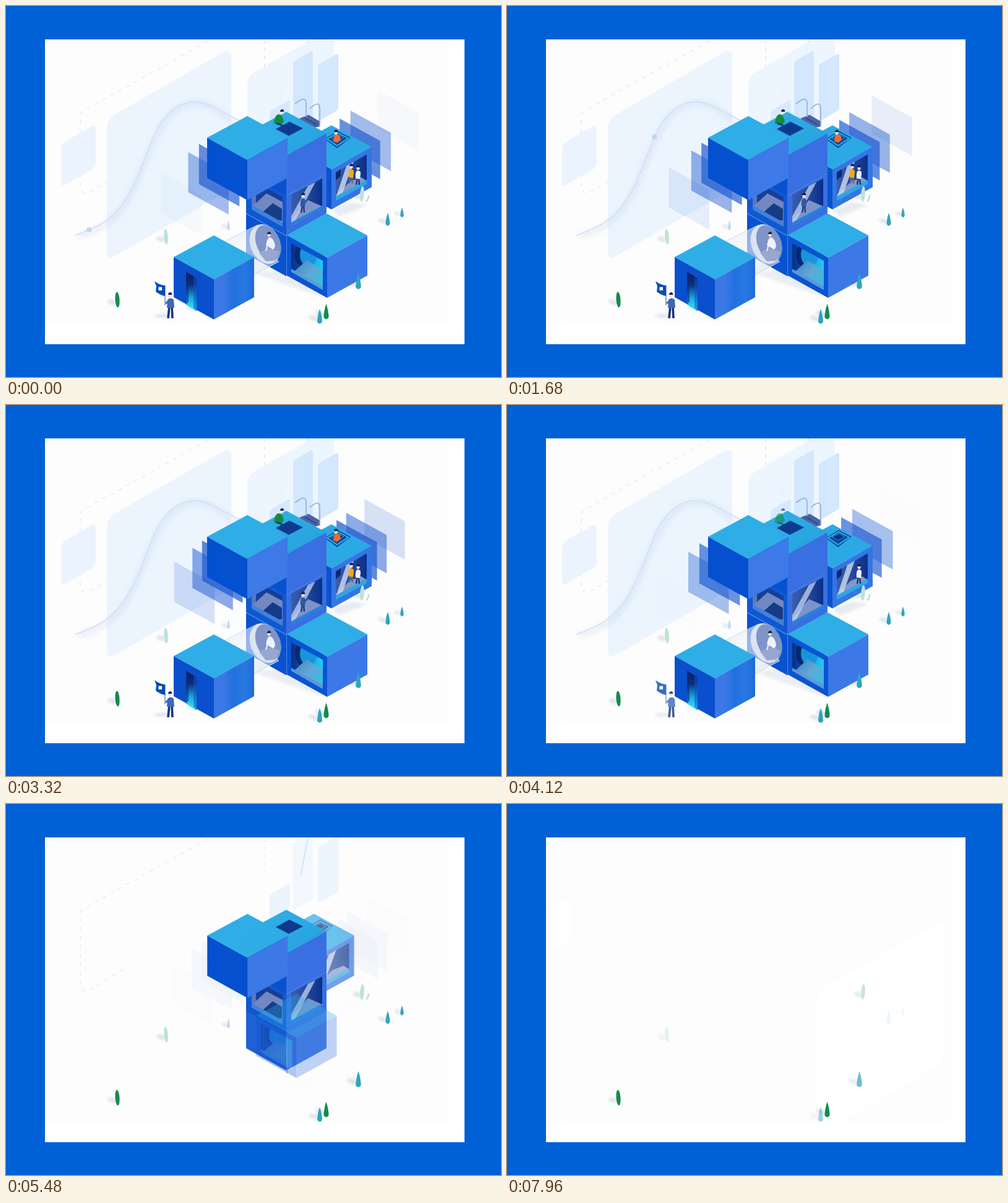
An HTML page for the animation above (8 s loop, 800 by 600 pixels).

```html
<!DOCTYPE html>
<html lang="en">
<head>
<meta charset="utf-8">
<title>Isometric blocks</title>
<style>
html, body { margin: 0; width: 100%; height: 100%; overflow: hidden; background: #0061d7; }
svg { display: block; width: 100vw; height: 100vh; }
</style>
</head>
<body>
<svg id="stage" viewBox="0 0 800 600"></svg>
<script>
const LOOP = 8000;
const stage = document.getElementById('stage');

const clamp = v => Math.max(0, Math.min(1, v));
const ramp = (t, from, to) => clamp((t - from) / (to - from));

const poly = (points, fill, extra = '') => `<polygon points="${points}" fill="${fill}" ${extra}/>`;
const shape = (d, fill) => `<path d="${d}" fill="${fill}"/>`;
const line = (d, color, width, extra = '') =>
  `<path d="${d}" fill="none" stroke="${color}" stroke-width="${width}" ${extra}/>`;
const oval = (x, y, rx, ry, fill, extra = '') =>
  `<ellipse cx="${x}" cy="${y}" rx="${rx}" ry="${ry}" fill="${fill}" ${extra}/>`;

// A group that fades out between two times while it drifts by (dx, dy).
const leaving = (from, to, dx, dy, content) =>
  `<g class="leaving" data-exit="${from} ${to} ${dx} ${dy}">${content}</g>`;

function cube(x, y, left = '#0650cd', right = '#3c78e6', top = '#2fade6') {
  const m = x + 65, r = x + 130;
  return poly(`${x},${y} ${m},${y - 35} ${r},${y} ${m},${y + 36}`, top) +
    poly(`${x},${y} ${m},${y + 36} ${m},${y + 101} ${x},${y + 65}`, left) +
    poly(`${m},${y + 36} ${r},${y} ${r},${y + 65} ${m},${y + 101}`, right);
}

const panel = (x, y, w, h, rx, fill, extra = '') =>
  `<rect transform="translate(${x} ${y}) skewY(-30)" width="${w}" height="${h}" rx="${rx}" fill="${fill}" ${extra}/>`;

const head = (x, y) => oval(x, y, 2.6, 3.3, '#f6e3df') +
  shape(`M${x - 3} ${y - 1}q0 -4 4 -4q3 1 2 4z`, '#14265c');

const person = (x, y, shirt, legs) =>
  line(`M${x - 1} ${y + 15}l-2 12M${x + 1} ${y + 15}l1 12`, legs, 2.5) +
  shape(`M${x - 4} ${y + 17}q-1 -12 3 -13q6 0 5 6l-1 8z`, shirt) + head(x, y);

// Listed in order of appearance; they leave in reverse order.
const trees = [
  ['leaf', 180, 475, 7, 25, '#128c4b', 7650],
  ['cone', 517.5, 494, 8, 25, '#128c4b', 7650],
  ['leaf', 575.5, 304, 6.5, 25, '#bce2d5', 7747],
  ['cone', 569.5, 445, 8.5, 26, '#2fa5bf', 7785],
  ['cone', 507, 502, 8, 24, '#2fa5bf', 7847],
  ['leaf', 258.5, 373, 6.5, 25, '#bce2d5', 7860],
  ['cone', 617, 345, 7, 21, '#2fa5bf', 7935],
  ['cone', 640, 334, 5.5, 16, '#2fa5bf', 7942],
  ['cone', 359.5, 354.5, 5, 16, '#c4d9f1', 8000]
];

function tree([kind, x, y, w, h, color]) {
  const a = w / 2, b = h / 2;
  const crown = kind === 'leaf'
    ? oval(x, y, a, b, color, `transform="rotate(${x > 500 ? 4 : -4} ${x} ${y})"`)
    : shape(`M${x} ${y - b}Q${x + a} ${y} ${x + a} ${y + b - 3}Q${x} ${y + b + 3} ${x - a} ${y + b - 3}Q${x - a} ${y} ${x} ${y - b}`, color);
  return `<g class="tree">${oval(x - w, y + h * .25, w * 1.1, h * .15, '#5b77a8',
    `opacity=".2" filter="url(#soft)" transform="rotate(18 ${x} ${y})"`)}${crown}</g>`;
}

const GRAPH = 'M112 371C118 369 126 366 134 362C195 340 213 277 239 210C254 176 278 154 308 155' +
  'C331 157 353 174 377 185C405 200 437 190 443 155C445 135 449 122 457 122' +
  'C467 122 471 132 477 112L485 70L489 50';

const gradient = (id, x2, y2, ...stops) =>
  `<linearGradient id="${id}" x2="${x2}" y2="${y2}">${stops.map((c, i) =>
    `<stop offset="${i / (stops.length - 1)}" stop-color="${c}"/>`).join('')}</linearGradient>`;

const defs = `<defs>
  <clipPath id="view"><rect x="63" y="54" width="654" height="460"/></clipPath>
  <clipPath id="hall"><path d="M461 384L512 412V459L461 430z"/></clipPath>
  <filter id="soft" x="-60%" y="-60%" width="220%" height="220%"><feGaussianBlur stdDeviation="2"/></filter>
  <filter id="blur" x="-10%" y="-10%" width="120%" height="120%"><feGaussianBlur stdDeviation="4"/></filter>
  ${gradient('door', 0, 1, '#0a1c57', '#0d2f80', '#18a9e6', '#48ebf5')}
  ${gradient('side', 1, 0, '#3d79e6', '#3b78e5', '#2070de', '#2a78e2', '#1c6bdb')}
  ${gradient('hallway', 1, 0, '#07307f', '#0a4bb4', '#19a7e2', '#22cdf0')}
  ${gradient('walkway', 1, 1, '#3f7fc4', '#5fa9d6', '#25c3ea')}
  ${gradient('room', 1, 0, '#3a5eae', '#24489c', '#0a2f88')}
  ${gradient('glass', 1, 1, '#dfe5f2', '#f5f7fb', '#ccd6ea')}
  ${gradient('roof', 1, 1, '#34b2e8', '#249fdd')}
</defs>`;

const backWall =
  leaving(6200, 6700, 0, 0, line('M326 57L126 169Q120 172 120 180V294Q121 306 134 301Q150 293 195 264',
    '#e2e6ec', 1.2, 'stroke-dasharray="6 8.5"')) +
  leaving(5250, 5700, 0, 0, line('M418 54V112', '#dbe2ee', 1.2, 'stroke-dasharray="6 7"')) +
  leaving(4720, 5240, -34, -34, panel(163, 183, 201, 229, 13, '#ecf5fe')) +
  leaving(4750, 5300, -5, -4, panel(89, 223, 56, 70, 7, '#ebf4fe'));

const graph =
  leaving(4450, 4850, 0, 0, `<g transform="translate(5 9)">${line(
    'M112 363C200 345 205 260 239 201C258 160 290 135 330 155L366 180', '#9fb5dc', 8,
    'opacity=".22" filter="url(#blur)"')}</g>`) +
  line(GRAPH, '#cfe0f8', 1.8, 'id="graph"') +
  '<circle id="ball" r="4.2" fill="#bfd6f7"/>';

const chartWall =
  leaving(4500, 5080, -12, -8, panel(390, 114, 140, 130, 12, '#ebf5fe', 'fill-opacity=".88"')) +
  leaving(5150, 5600, 0, -30, panel(464, 90, 32, 110, 4, '#d3e7fd')) +
  leaving(5200, 5650, 0, -30, panel(504, 95, 33, 92, 4, '#d3e7fd')) +
  leaving(5250, 5700, 0, -30, panel(426, 170, 33, 40, 4, '#d8e9fd'));

const groundShadows = leaving(5200, 5500, 0, 0,
  poly('400,432 455,425 520,473 505,469', '#dde3ee', 'opacity=".6" filter="url(#soft)"') +
  poly('526,329 560,318 584,322 538,340', '#dde3ee', 'opacity=".7" filter="url(#soft)"'));

const ECHOES = 4;
const echoes = leaving(5200, 5500, 0, 0,
  `<g class="echo">${poly('0,0 65.5,36 65.5,101 0,65', '#1c59cf') + poly('0,0 65.5,36 65.5,98 0,62', '#1c59cf')}</g>`
    .repeat(ECHOES));

const rails = leaving(5100, 5400, 0, -12,
  poly('474,182 489,176 508,187 507,195 496,197', '#4a63a3') +
  line('M477 185L495 195M483 181L502 192', '#203b7d', 1.3) +
  line('M467 158L473 154Q484 146 485 157V180M491 166L497 161Q507 154 507 166V195', '#94abdc', 1.6));

const rightCube = leaving(5350, 5780, -55, -30,
  cube(461, 228, '#0a52ce', '#3575e4', '#2ca9e4') +
  poly('515,215 536,202 557,213 535,230', '#0d49a6') +
  line('M519 215L536 205L553 214L535 226Z', '#27bfee', 1.8) +
  poly('523,214 537,207 549,213 535,221', '#0a2f7c') +
  line('M525 213.500L537 208L546 213L535 219Z', '#2bb4ea', 1) +
  poly('533,269 583,240 583,287 533,314', 'url(#room)') +
  poly('533,269 541,264 541,275 533,282', '#0a2a74') +
  poly('533,314 533,306 556,284 574,277 583,283 583,287', '#8398cb') +
  poly('534,307 550,259 562,252 544,302', '#d3dcef', 'opacity=".8"') +
  poly('533,308 583,281 583,288 533,315', '#2da7e2')) +
  leaving(3850, 4080, 0, 0, person(558, 260, '#f6a90a', '#5f6f9c')) +
  leaving(4150, 4350, 0, 0, person(569, 262, '#edf2fa', '#203773')) +
  leaving(3850, 4050, 0, 0, shape('M529 219q0 -11 6 -12q6 2 6 10l-6 4z', '#f06a2b') + head(533, 205));

const lowerMid = leaving(5450, 5800, 0, -35, cube(388, 336, '#0952d0', '#3270dd'));

const midCube = leaving(5600, 6000, 0, -30,
  cube(388, 270, '#1157d2', '#386fe0') +
  poly('397,281 447,309 447,357 397,329', '#173f99') +
  poly('397,300 404,305 404,322 397,328', '#5b78bb') +
  poly('397,329 397,325 421,303 447,317 447,357', '#7188c1') +
  poly('413,335 431,319 446,328 446,347 434,346', '#173c87') +
  poly('397,322 447,350 447,357 397,329', '#3d82dd') +
  poly('461,305 511,279 511,329 461,355', 'url(#room)') +
  poly('461,354 461,346 488,314 511,324 511,329', '#7d94cb') +
  poly('461,340 488,291 500,285 466,350 461,350', '#c6d3ef', 'opacity=".75"') +
  poly('461,350 511,323 511,329 461,356', '#2b7fdc') +
  line('M447 302L454 306L517 271', '#8fbcf8', 1.3) + line('M454 374V436', '#6fa0ee', 1.2)) +
  leaving(3800, 4080, 0, 0, person(480, 307, '#34579f', '#203d82'));

const topCube = leaving(5700, 6070, 0, -20,
  cube(388, 206, '#0751cf', '#396fe1', 'url(#roof)') +
  poly('436,199 458,187 480,198 457,210', '#0d3a8f')) +
  leaving(4020, 4270, 0, 0, shape('M433 190q1 -14 8 -15q7 2 8 13l-7 4z', '#128c3c') +
    line('M437 190l8 2l2 6', '#173a82', 3) + head(446, 172));

const leftCube = leaving(5480, 5880, 50, -28, cube(325, 213, '#0450cf', '#3d79e7'));

const frontCube = leaving(5180, 5620, -55, -32,
  cube(454, 371, '#0a53d2', '#3c79e7') +
  poly('461,384 512,412 512,459 461,430', 'url(#hallway)') +
  '<g clip-path="url(#hall)">' + oval(481, 402, 14, 20, '#08286f') + oval(489, 402, 14, 19, '#1695dc') +
  poly('461,434 486,411 512,428 512,460', 'url(#walkway)') + poly('461,425 512,453 512,460 461,432', '#5d97d6') +
  '</g>');

const tube = leaving(4400, 4750, 0, 0,
  poly('345,385 407,354 441,414 401,435 401,408', 'url(#glass)', 'opacity=".6"') +
  line('M346 384L407 354M401 435L441 413', '#cfd8ea', 1) +
  `<g transform="rotate(-22 419 385)">${oval(419, 385, 24, 33, '#dce3f1') + oval(424, 385, 19, 30, '#7f94c8')}</g>` +
  poly('409,399 424,392 443,397 435,412 420,413', '#97a7cf')) +
  leaving(4200, 4400, 0, 0, shape('M420 387q2 -13 7 -13q7 3 8 15l-3 5z', '#edf2fa') +
    head(425, 370) + line('M423 386l-3 10', '#e5ebf6', 2.4));

const smallCube = leaving(4800, 5280, 70, -44,
  oval(302, 488, 11, 4, '#b8eef5', 'opacity=".55" filter="url(#soft)"') +
  cube(271, 406, '#0a4fcb', 'url(#side)') +
  poly('291,430 308,440 308,494 291,483', 'url(#door)') +
  poly('291,430 295,433 295,478 291,483', '#0d2d79', 'opacity=".6"') +
  poly('303,437 308,440 308,494 303,488', '#0c52c4', 'opacity=".55"'));

const flagBearer = leaving(4080, 4290, 0, 0,
  oval(252, 501, 13, 2.5, '#8a9dc0', 'opacity=".3" filter="url(#soft)"') +
  line('M257 452V484', '#5375b5', 1.2) +
  shape('M240 445Q248 451 257 452V469Q250 468 242 462L243 453Z', '#0b4cb5') +
  '<rect x="246.500" y="454.500" width="5.500" height="5.500" fill="#fff"/>' +
  line('M264 485L262 505M268 485L269 505', '#183473', 3.6) +
  shape('M260 488L261 475Q266 470 271 475L272 488Z', '#3c69b6') +
  line('M263 477L258 481', '#3c69b6', 3) + head(265, 468));

const sprig = leaving(6200, 6500, 0, 0, line('M582 316Q586 313 586 306', '#bce2d5', 2.6));

stage.innerHTML = defs +
  '<rect width="800" height="600" fill="#0061d7"/><rect x="63" y="54" width="678" height="493" fill="#fff"/>' +
  '<rect x="63" y="54" width="654" height="460" fill="#fdfdfd"/><g clip-path="url(#view)">' +
  `<g id="arrivals">${panel(502, 304, 203, 232, 13, '#fff') + panel(50, 180, 53, 70, 7, '#fff')}</g>` +
  backWall + graph + chartWall + groundShadows + echoes + rails + rightCube + lowerMid + midCube +
  topCube + leftCube + frontCube + tube + smallCube + flagBearer + sprig + trees.map(tree).join('') + '</g>';

const find = selector => [...stage.querySelectorAll(selector)];
const exits = find('.leaving').map(el => ({ el, exit: el.dataset.exit.split(' ').map(Number) }));
const treeEls = find('.tree');
const echoEls = find('.echo');
const graphEl = document.getElementById('graph');
const ballEl = document.getElementById('ball');
const arrivalsEl = document.getElementById('arrivals');
const graphLength = graphEl.getTotalLength();

// Each echo leaves its cube ever faster; a new one starts every two seconds.
function drawEchoes(t) {
  echoEls.forEach((el, i) => {
    const age = (t / 1000 + .96) % 2 + 2 * (i - 1);
    const opacity = age > 5.1 ? 0 : .72 * (1 - (Math.max(0, age) / 5.1) ** 1.5) * ramp(age, -.4, 0);
    const shift = -6 + 7.5 * age + .0105 * age ** 5;
    el.setAttribute('opacity', opacity);
    el.children[0].setAttribute('transform', `translate(${313 - shift} ${222 + shift * .76})`);
    el.children[1].setAttribute('transform', `translate(${538 + shift} ${183 - shift * .75})`);
  });
}

function drawGraph(t) {
  const erased = graphLength * ramp(t, 4500, 5600);
  graphEl.setAttribute('stroke-dasharray', `0 ${erased} ${graphLength}`);
  graphEl.setAttribute('opacity', 1 - ramp(t, 5500, 5650));
  const at = graphEl.getPointAtLength(24 + .1125 * t);
  ballEl.setAttribute('transform', `translate(${at.x} ${at.y})`);
  ballEl.setAttribute('opacity', 1 - ramp(t, 5050, 5250));
}

function draw(now) {
  const t = now % LOOP;
  exits.forEach(({ el, exit: [from, to, dx, dy] }) => {
    const p = ramp(t, from, to);
    const eased = 1 - (1 - p) ** 2;
    el.setAttribute('opacity', 1 - p);
    el.setAttribute('transform', `translate(${dx * eased} ${dy * eased})`);
  });
  treeEls.forEach((el, i) => {
    const start = 6200 + (trees.length - 1 - i) * 58;
    const arrive = trees[i][6];
    el.setAttribute('opacity', 1 - ramp(t, start, start + 250) + ramp(t, arrive, arrive + 250));
  });
  drawEchoes(t);
  drawGraph(t);
  arrivalsEl.setAttribute('opacity', ramp(t, 7700, 7960));
  requestAnimationFrame(() => draw(performance.now()));
}
draw(0);
</script>
</body>
</html>
```
